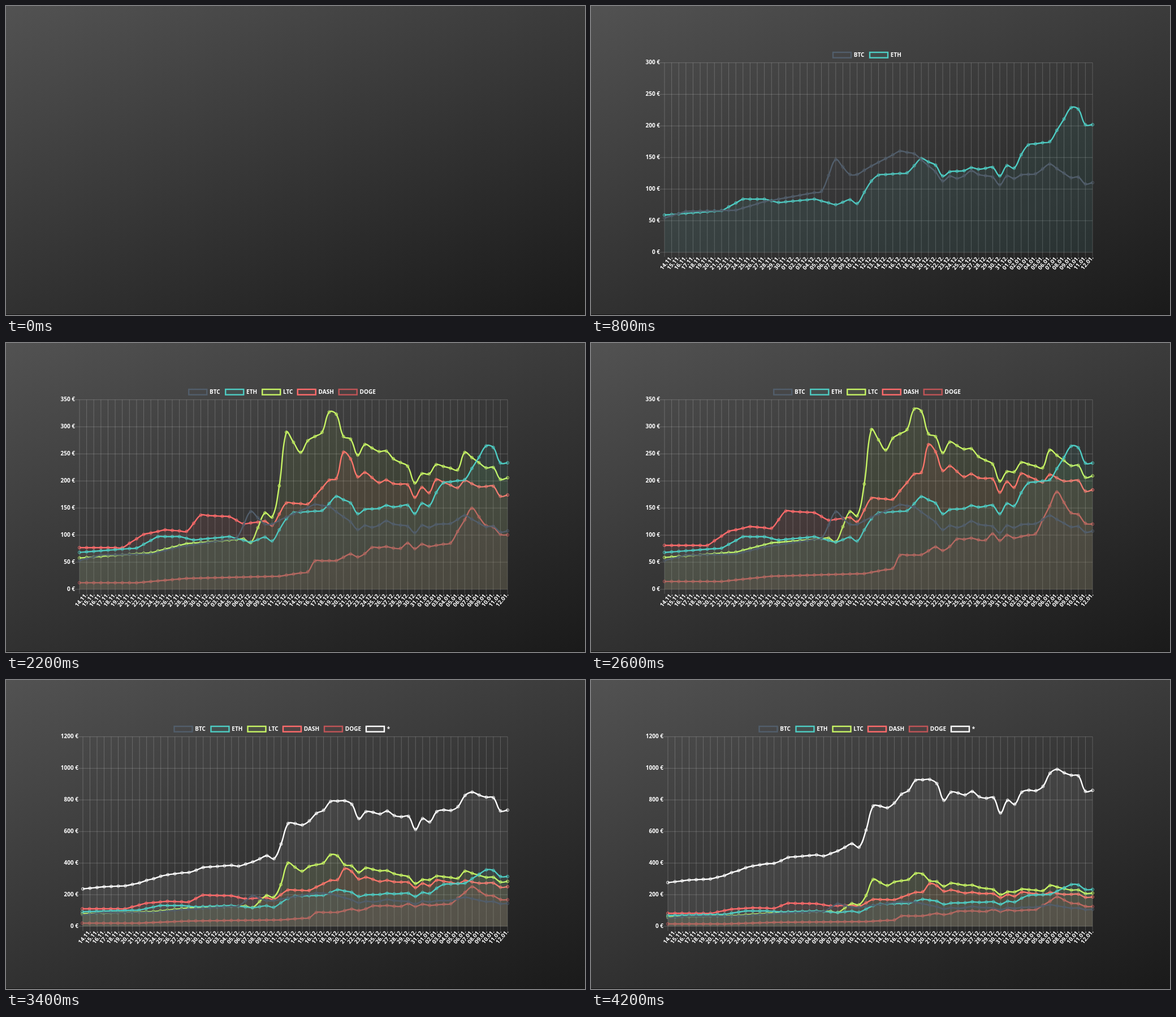
An HTML page with a canvas that plays this animation: 1024x547 px, repeating every 4390 ms.

```html
<!DOCTYPE html>
<html lang="en">
<head>
<meta charset="utf-8">
<title>Portfolio chart</title>
<style>
html, body { margin: 0; width: 100%; height: 100%; overflow: hidden; }
body { background: linear-gradient(160deg, #525252, #1a1a1a); }
canvas { display: block; }
</style>
</head>
<body>
<canvas id="chart" width="1024" height="547"></canvas>
<script>
const ctx = document.getElementById('chart').getContext('2d');
const LOOP = 4390, STEP = 100, LAST = 4200;
const COUNT = 61, TOP = 100.4, BASE = 436, RIGHT = 887, TICK = 8, LINE = 2.4, FILL = 0.07;

// Relative moves that hit every coin on the same day.
const swings = { 39: -0.09, 43: 0.03, 47: -0.11, 49: -0.04, 59: -0.1, 60: -0.09 };

// Daily prices from a few [day, price] turning points.
function prices(keys) {
  return Array.from({ length: COUNT }, (_, day) => {
    const k = Math.max(1, keys.findIndex(key => key[0] >= day));
    const [d0, v0] = keys[k - 1], [d1, v1] = keys[k];
    return (v0 + (v1 - v0) * (day - d0) / (d1 - d0)) * (1 + (swings[day] || 0));
  });
}

// slot: width taken in the legend
const series = [
  { name: 'BTC', rgb: '82,94,107', slot: 65, data: prices([
    [0, 53], [3, 63], [10, 65], [14, 78], [22, 94], [24, 143], [26, 120], [27, 120], [29, 133],
    [33, 156], [35, 152], [38, 124], [41, 114], [43, 122], [46, 116], [52, 121], [54, 136], [57, 115], [60, 118]]) },
  { name: 'ETH', rgb: '78,205,196', slot: 65, data: prices([
    [0, 68], [8, 76], [11, 97], [14, 97], [16, 91], [21, 97], [24, 87], [26, 96], [27, 89], [29, 130], [30, 141],
    [34, 145], [36, 171], [38, 159], [40, 147], [43, 150], [49, 160], [51, 196], [54, 202], [57, 264], [60, 256]]) },
  { name: 'LTC', rgb: '199,244,100', slot: 62.5, data: prices([
    [0, 59], [10, 69], [15, 86], [23, 95], [24, 88], [26, 144], [27, 136], [28, 195], [29, 296], [31, 258], [32, 280],
    [34, 296], [35, 334], [36, 330], [37, 288], [40, 273], [43, 253], [48, 218], [50, 235], [53, 225], [54, 258],
    [57, 229], [60, 231]]) },
  { name: 'DASH', rgb: '255,107,107', slot: 73, data: prices([
    [0, 82], [6, 82], [9, 108], [12, 117], [15, 114], [17, 146], [21, 143], [23, 129], [26, 134], [27, 126], [29, 170],
    [32, 168], [35, 215], [36, 218], [37, 270], [40, 230], [42, 210], [46, 206], [49, 198], [50, 216], [53, 200],
    [54, 214], [56, 202], [60, 204]]) },
  { name: 'DOGE', rgb: '192,84,87', slot: 74, data: prices([
    [0, 15], [8, 15], [15, 25], [28, 30], [32, 40], [33, 65], [36, 66], [38, 81], [40, 82], [41, 96], [45, 94],
    [46, 106], [50, 101], [52, 106], [55, 186], [57, 146], [60, 137]]) }
];
series.push({
  name: '*', rgb: '255,255,255', slot: 51.5,
  data: series[0].data.map((_, i) => series.reduce((sum, s) => sum + s.data[i], 0))
});

// Each stage adds one series, rescales the axis and restarts the easing.
const stages = [
  { at: 8, time: 1275, max: 160, tick: 20, left: 130 },
  { at: 295, time: 1275, max: 300, tick: 50, left: 130 },
  { at: 973, time: 1275, max: 350, tick: 50, left: 130 },
  { at: 1282, time: 1400, max: 350, tick: 50, left: 130 },
  { at: 1630, time: 1700, max: 350, tick: 50, left: 130 },
  { at: 2750, time: 1700, max: 1200, tick: 200, left: 136 }
];

const labels = Array.from({ length: COUNT }, (_, i) => {
  if (!i) return '';
  const [, m, d] = new Date(Date.UTC(2017, 10, 13 + i)).toISOString().slice(0, 10).split('-');
  return `${d}.${m}.`;
});

const easeOutQuart = t => 1 - (1 - Math.min(t, 1)) ** 4;
const xAt = (i, left) => left + (RIGHT - left) * i / (COUNT - 1);

function pointsAt(index, now) {
  let left = stages[index].left, scale = 0;
  for (let k = index; k < stages.length && stages[k].at <= now; k++) {
    const s = stages[k];
    const end = k + 1 < stages.length ? Math.min(now, stages[k + 1].at) : now;
    const p = easeOutQuart((end - s.at) / s.time);
    left += (s.left - left) * p;
    scale += (1 / s.max - scale) * p;
  }
  return series[index].data.map((v, i) => ({ x: xAt(i, left), y: BASE - (BASE - TOP) * v * scale }));
}

function segment(x1, y1, x2, y2) {
  ctx.beginPath();
  ctx.moveTo(x1, y1);
  ctx.lineTo(x2, y2);
  ctx.stroke();
}

function drawAxes({ max, tick, left }) {
  ctx.lineWidth = 0.8;
  ctx.strokeStyle = 'rgba(255,255,255,.25)';
  ctx.fillStyle = '#fff';
  ctx.textAlign = 'right';
  for (let v = 0; v <= max; v += tick) {
    const y = BASE - (BASE - TOP) * v / max;
    segment(left - TICK, y, RIGHT, y);
    ctx.fillText(v + ' €', left - TICK, y);
  }
  labels.forEach((text, i) => {
    const x = xAt(i, left);
    segment(x, TOP, x, BASE + TICK);
    ctx.save();
    ctx.translate(x, BASE + TICK);
    ctx.rotate(-50 * Math.PI / 180);
    ctx.fillText(text, 0, 0);
    ctx.restore();
  });
}

function drawLegend(shown) {
  let x = 493 - shown.reduce((sum, s) => sum + s.slot, 0) / 2;
  ctx.textAlign = 'left';
  ctx.lineWidth = LINE;
  for (const s of shown) {
    ctx.fillStyle = `rgba(${s.rgb},${FILL})`;
    ctx.strokeStyle = `rgb(${s.rgb})`;
    ctx.fillRect(x, 82, 32, 9.6);
    ctx.strokeRect(x, 82, 32, 9.6);
    ctx.fillStyle = '#fff';
    ctx.fillText(s.name, x + 36.8, 86.8);
    x += s.slot;
  }
}

// Curve through the points with tension 0.4, kept inside the plot.
function smoothPath(pts) {
  const path = new Path2D();
  const handles = pts.map((p, i) => {
    const a = pts[i - 1] || p, b = pts[i + 1] || p;
    const before = Math.hypot(p.x - a.x, p.y - a.y), after = Math.hypot(b.x - p.x, b.y - p.y);
    const f = 0.4 * before / (before + after), g = 0.4 * after / (before + after);
    const dx = b.x - a.x, dy = b.y - a.y;
    const cap = y => Math.max(TOP, Math.min(BASE, y));
    return { inX: p.x - f * dx, inY: cap(p.y - f * dy), outX: p.x + g * dx, outY: cap(p.y + g * dy) };
  });
  path.moveTo(pts[0].x, pts[0].y);
  for (let i = 1; i < pts.length; i++) {
    const h = handles[i - 1], n = handles[i];
    path.bezierCurveTo(h.outX, h.outY, n.inX, n.inY, pts[i].x, pts[i].y);
  }
  return path;
}

function drawSeries(index, now) {
  const pts = pointsAt(index, now), line = smoothPath(pts), area = new Path2D(line);
  area.lineTo(pts[COUNT - 1].x, BASE);
  area.lineTo(pts[0].x, BASE);
  ctx.fillStyle = `rgba(${series[index].rgb},${FILL})`;
  ctx.strokeStyle = `rgb(${series[index].rgb})`;
  ctx.fill(area);
  ctx.lineWidth = LINE;
  ctx.stroke(line);
  ctx.lineWidth = 0.9;
  for (const p of pts) {
    ctx.beginPath();
    ctx.arc(p.x, p.y, 2.5, 0, 2 * Math.PI);
    ctx.fill();
    ctx.stroke();
  }
}

function draw(now) {
  ctx.clearRect(0, 0, 1024, 547);
  ctx.fillStyle = '#141414';
  ctx.fillRect(0, 546, 1024, 1);
  ctx.font = "bold 10px 'Noto Sans', 'Open Sans', sans-serif";
  ctx.textBaseline = 'middle';
  const count = stages.filter(s => s.at <= now).length;
  if (!count) return;
  drawAxes(stages[count - 1]);
  for (let i = count - 1; i >= 0; i--) drawSeries(i, now);
  drawLegend(series.slice(0, count));
}

const start = performance.now();
function tick() {
  const t = (performance.now() - start) % LOOP;
  draw(Math.min(LAST, Math.floor(t / STEP) * STEP));
  requestAnimationFrame(tick);
}
tick();
</script>
</body>
</html>
```
